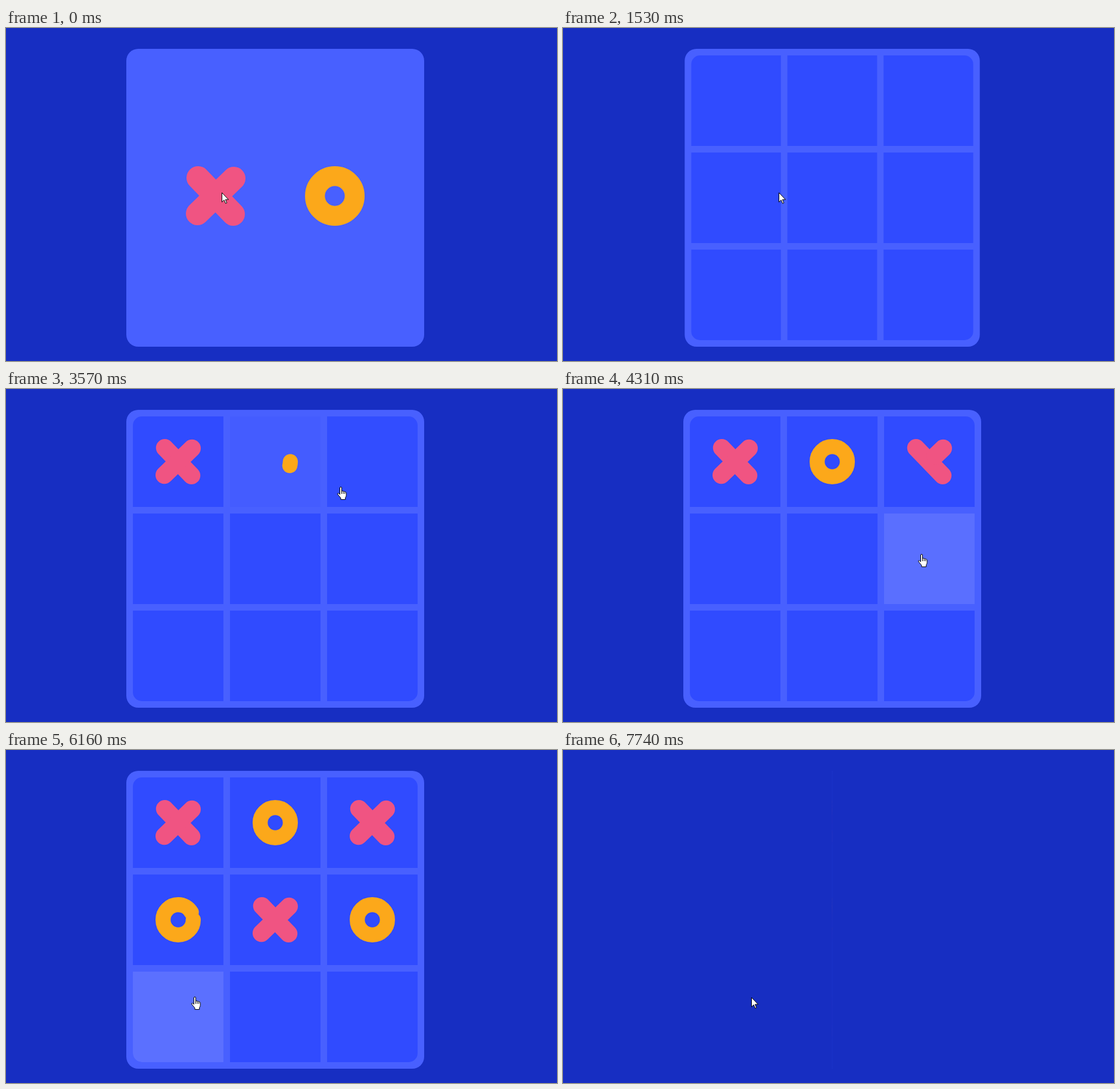
Write an HTML page with a canvas that moves like this. It is 925x559 px and loops after 8 s.

```html
<!DOCTYPE html>
<html lang="en">
<head>
<meta charset="utf-8">
<title>Noughts and crosses</title>
<style>
  html, body { margin: 0; width: 100%; height: 100%; overflow: hidden; background: #172ec2; }
  canvas { display: block; }
</style>
</head>
<body>
<canvas id="stage" width="925" height="559"></canvas>
<script>
const ctx = document.getElementById('stage').getContext('2d');
const LOOP = 8000;
const CENTER = 452, LEFT = 202, TOP = 35, SIZE = 500;
const GAP = 11, CELL = 152, MARK = 76;
const STROKE_MS = 340, RING_MS = 700, FADE_MS = 300, TURN_MS = 500;
const COLOR = { back: '#172ec2', panel: '#4860ff', cell: '#304bff', hover: '#5b70ff', x: '#f05482', o: '#fca81a' };

// Playback advances in steps: [first, last, count]
const SPANS = [
  [150, 720, 5], [1130, 2080, 8], [2230, 3140, 8], [3290, 4310, 8],
  [4460, 5470, 8], [5590, 6160, 5], [6440, 7030, 5], [7310, 7740, 4]
];

// Time the pointer enters and leaves a cell, and the click that places a mark
const VISITS = [
  { cell: 3, enter: 1800, leave: 2120 },
  { cell: 0, enter: 2190, leave: 2840, click: 2790, mark: 'x' },
  { cell: 1, enter: 2870, leave: 3488, click: 3480, mark: 'o' },
  { cell: 2, enter: 3560, leave: 4000, click: 3845, mark: 'x' },
  { cell: 5, enter: 4030, leave: 4740, click: 4400, mark: 'o' },
  { cell: 4, enter: 4790, leave: 5085, click: 4920, mark: 'x' },
  { cell: 3, enter: 5170, leave: 5790, click: 5600, mark: 'o' },
  { cell: 6, enter: 5830, leave: 6430, click: 6330, mark: 'x' }
];

// Pointer path: [time, x, y]
const PATH = [
  [1700, 362, 276], [2080, 326, 236], [2250, 312, 165], [2450, 308, 140], [2720, 318, 136],
  [2870, 378, 136], [3100, 432, 142], [3430, 470, 150], [3581, 561, 165], [3750, 606, 158],
  [3900, 612, 164], [4030, 612, 210], [4250, 602, 276], [4620, 598, 288], [4790, 526, 290],
  [4900, 458, 289], [5085, 374, 284], [5181, 328, 278], [5400, 312, 281], [5640, 308, 290],
  [5830, 315, 376], [5960, 316, 408], [6120, 316, 415]
];

const ARROW = new Path2D('M.5.5V16.2L4.1 12.7 6.6 18.5 8.8 17.6 6.4 12H11.5Z');
const HAND = new Path2D('M4.5 13V2q0-1.5 1.5-1.5T7.5 2V8q0-1 1.3-1t1.4 1.3q.3-.8 1.3-.6t1.2 1.4q.5-.7 1.4-.3T15.2 11V14.5q0 2-1.5 4V21.5H6V19L1.2 13.2Q.2 11.6 1.2 11T3.4 12Z');
const FINGERS = new Path2D('M7.5 8V12M10.2 8.5V12M12.7 9.5V12');

const clamp = v => Math.min(1, Math.max(0, v));
const bez = (a, b, u) => 3 * a * u * (1 - u) ** 2 + 3 * b * u * u * (1 - u) + u ** 3;

function easing(x1, y1, x2, y2) {
  return v => {
    if (v <= 0) return 0;
    if (v >= 1) return 1;
    let lo = 0, hi = 1;
    for (let i = 0; i < 24; i++) {
      const mid = (lo + hi) / 2;
      if (bez(x1, x2, mid) < v) lo = mid; else hi = mid;
    }
    return bez(y1, y2, lo);
  };
}
const ease = easing(.25, .1, .25, 1);
const easeInOut = easing(.42, 0, .58, 1);
const run = (t, start, ms, curve) => curve(clamp((t - start) / ms));

function stepTime(t) {
  let s = 0;
  for (const [first, last, count] of SPANS) {
    if (t < first) break;
    const step = (last - first) / (count - 1);
    s = first + step * Math.min(count - 1, Math.floor((t - first + 25) / step));
  }
  return s;
}

function fillRound(x, y, size, r, color) {
  ctx.fillStyle = color;
  ctx.beginPath();
  ctx.roundRect(x, y, size, size, r);
  ctx.fill();
}

// Marks are laid out on a 100 x 100 square
function drawMark(kind, x, y, size, first, second) {
  ctx.save();
  ctx.translate(x, y);
  ctx.scale(size / 100, size / 100);
  ctx.lineCap = 'round';
  ctx.strokeStyle = COLOR[kind];
  if (kind === 'x') {
    ctx.lineWidth = 39;
    drawLine(20.5, 19.5, 79.5, 80.5, first);
    drawLine(80.5, 20.5, 19.5, 79.5, second);
  } else if (first > 0) {
    ctx.lineWidth = 33.3;
    ctx.beginPath();
    ctx.arc(50, 50, 33.35, 0, 2 * Math.PI * first);
    ctx.stroke();
  }
  ctx.restore();
}

function drawLine(x1, y1, x2, y2, part) {
  if (part <= 0) return;
  ctx.beginPath();
  ctx.moveTo(x1, y1);
  ctx.lineTo(x1 + (x2 - x1) * part, y1 + (y2 - y1) * part);
  ctx.stroke();
}

function drawChooser() {
  fillRound(LEFT, TOP, SIZE, 20, COLOR.panel);
  drawMark('x', 302, 232, 100, 1, 1);
  drawMark('o', 502, 232, 100, 1);
}

const cellX = i => LEFT + GAP + (i % 3) * (CELL + GAP);
const cellY = i => TOP + GAP + Math.floor(i / 3) * (CELL + GAP);

function drawBoard(t) {
  fillRound(LEFT, TOP, SIZE, 20, COLOR.panel);
  ctx.save();
  ctx.beginPath();
  ctx.roundRect(LEFT + GAP, TOP + GAP, SIZE - 2 * GAP, SIZE - 2 * GAP, 15);
  ctx.clip();
  for (let i = 0; i < 9; i++) {
    ctx.fillStyle = COLOR.cell;
    ctx.fillRect(cellX(i), cellY(i), CELL, CELL);
  }
  for (const v of VISITS) {
    const glow = run(t, v.enter, FADE_MS, ease) * (1 - run(t, v.leave, FADE_MS, ease));
    if (!glow) continue;
    ctx.globalAlpha = glow;
    ctx.fillStyle = COLOR.hover;
    ctx.fillRect(cellX(v.cell), cellY(v.cell), CELL, CELL);
  }
  ctx.restore();
  const inset = (CELL - MARK) / 2;
  for (const v of VISITS) {
    if (!v.mark) continue;
    const ms = v.mark === 'x' ? STROKE_MS : RING_MS;
    drawMark(v.mark, cellX(v.cell) + inset, cellY(v.cell) + inset, MARK,
      run(t, v.click, ms, easeInOut), run(t, v.click + ms, ms, easeInOut));
  }
}

function squeeze(scale, draw) {
  if (scale <= 0) return;
  ctx.save();
  ctx.translate(CENTER, 0);
  ctx.scale(scale, 1);
  ctx.translate(-CENTER, 0);
  draw();
  ctx.restore();
}

function pointerAt(t) {
  const next = PATH.findIndex(p => p[0] > t);
  if (next === 0) return PATH[0].slice(1);
  if (next < 0) return PATH[PATH.length - 1].slice(1);
  const [t0, x0, y0] = PATH[next - 1], [t1, x1, y1] = PATH[next];
  const k = (t - t0) / (t1 - t0);
  return [Math.round(x0 + (x1 - x0) * k), Math.round(y0 + (y1 - y0) * k)];
}

function drawPointer(t) {
  const [x, y] = pointerAt(t);
  const hand = VISITS.some(v => t >= v.enter && t < v.leave);
  ctx.save();
  ctx.translate(hand ? x - 5 : x, hand ? y - 1 : y);
  ctx.fillStyle = '#fff';
  ctx.strokeStyle = '#000';
  ctx.lineWidth = 1;
  ctx.lineJoin = 'round';
  ctx.fill(hand ? HAND : ARROW);
  ctx.stroke(hand ? HAND : ARROW);
  if (hand) ctx.stroke(FINGERS);
  ctx.restore();
}

function draw(t) {
  ctx.fillStyle = COLOR.back;
  ctx.fillRect(0, 0, 925, 559);
  if (t < 1000) squeeze(1 - run(t, 120, TURN_MS, ease) * (t > 0), drawChooser);
  else squeeze(run(t, 1100, TURN_MS, ease) * (1 - run(t, 7250, TURN_MS, ease)), () => drawBoard(t));
  drawPointer(t);
}

function tick() {
  draw(stepTime(performance.now() % LOOP));
  requestAnimationFrame(tick);
}
tick();
</script>
</body>
</html>
```
